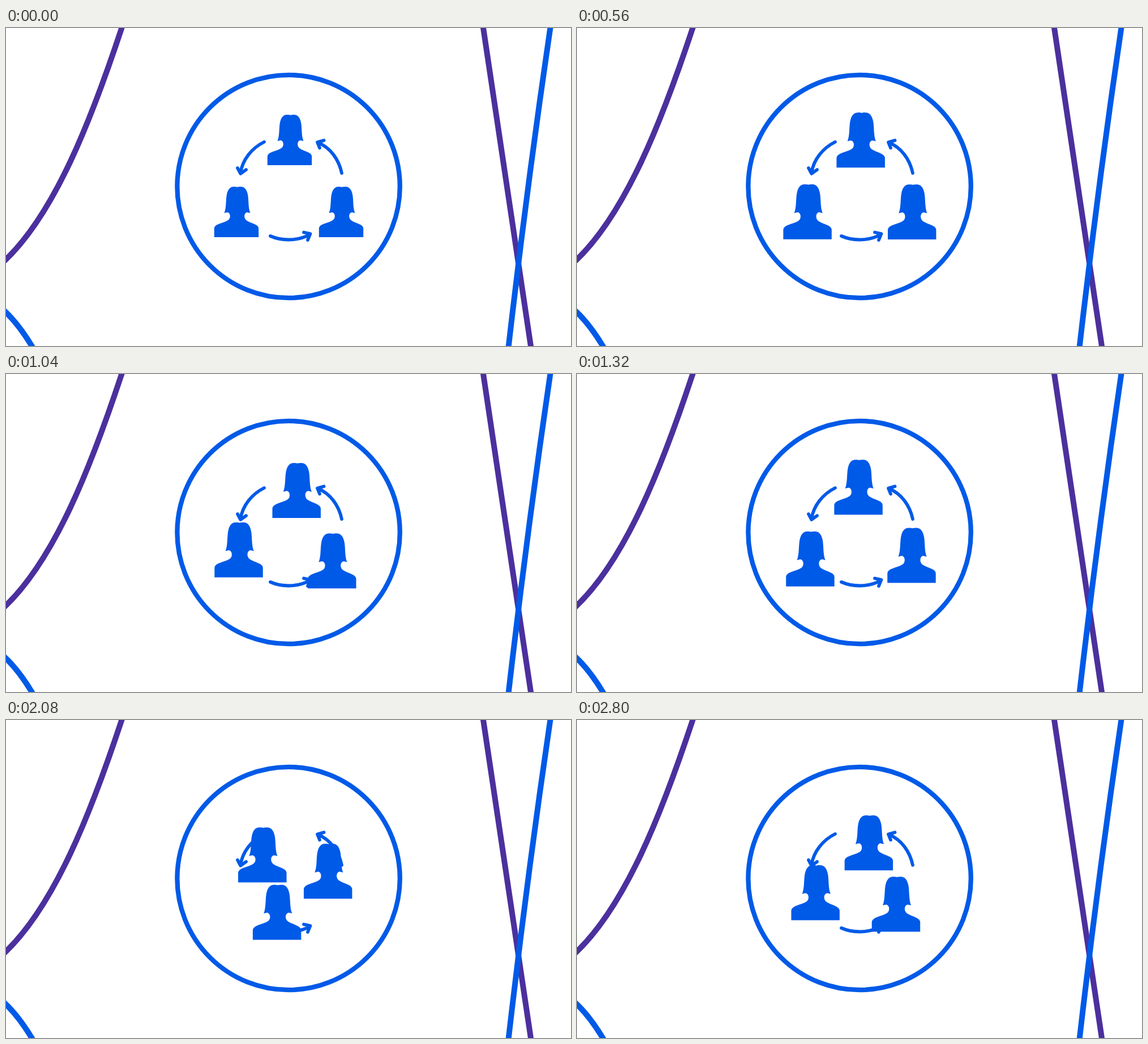
Recreate the animation shown at these times as an HTML page. Size 998 by 561 pixels, loop 2840 ms.

```html
<!DOCTYPE html>
<html lang="en">
<head>
<meta charset="utf-8">
<title>Rotating team</title>
<style>
  html, body { margin: 0; height: 100%; overflow: hidden; background: #fff; }
  svg { display: block; width: 100vw; height: 100vh; }
  .line { fill: none; stroke: #005ae8; stroke-width: 10; }
  .purple { stroke: #4b309e; }
  .ring { stroke-width: 8.3; }
  .arrow { stroke-width: 5.8; stroke-linecap: round; stroke-linejoin: round; }
  .people { fill: #005ae8; }
</style>
</head>
<body>
<svg viewBox="0 0 998 561">
  <defs>
    <path id="person" d="M-39.2 44.5V29Q-39 25-34 22.5C-25 18-13 17-11.5 10C-10 4-14 0-16.5.8Q-18.5 1-21.5 2
      C-17.5-7-19-22-17-31C-15-40-11-44.5-5-44.5Q0-44.7 1.5-43.8Q3-44.7 8-44.5C14-44.5 18-40 20-31
      C22-22 20.5-7 24.5 2Q21.5 1 19.5.8C17 0 13 4 14.5 10C16 17 26 18 34 22.5Q39 25 39.2 29V44.5Z"/>
  </defs>
  <path class="line purple" d="M207-8C150 165 85 330-5 413M842-7L928 568"/>
  <path class="line" d="M962.4-7Q920 280 887 568M-5 497Q22 521 48 565"/>
  <circle class="line ring" cx="499.1" cy="279.5" r="196.7"/>
  <path class="line arrow" d="M456 201C434 212 418 232 414 256M409 247L414.3 257L424 250
    M593 256C588 232 573 211 551 202M561.5 198.3L550 201.5L554 211.5
    M467 367C490 377 518 375 537 364M526 360.5L537.5 363L533 374"/>
  <g class="people"></g>
</svg>
<script>
const LOOP = 2840, TICK = 40, TURN = 597;
const seats = [[501, 197.5], [407, 324.5], [592, 324.5]];

const group = document.querySelector('.people');
const people = seats.map(() => {
  const person = document.createElementNS('http://www.w3.org/2000/svg', 'use');
  person.setAttribute('href', '#person');
  return group.appendChild(person);
});

// Slow at both seats, fast between them.
function ease(u) {
  const gone = u ** 2.5, left = 1.35 * (1 - u) ** 2.5;
  return gone / (gone + left);
}

function draw() {
  const time = Math.floor(performance.now() / TICK + 0.1) * TICK % LOOP;
  const turn = Math.floor(time / TURN), u = time / TURN - turn;
  const along = ease(u);
  // The arcs between seats swell and flatten once per loop.
  const bulge = 21 * Math.sin(Math.PI * time / LOOP) * Math.sin(Math.PI * along);
  // People are larger while on the move.
  const scale = 1 + 0.09 * Math.min(1, 25 * u, 25 * (1 - u));

  people.forEach((person, i) => {
    const [x, y] = seats[(i + turn) % 3], [nextX, nextY] = seats[(i + turn + 1) % 3];
    const dx = nextX - x, dy = nextY - y, out = bulge / Math.hypot(dx, dy);
    person.setAttribute('transform',
      `translate(${x + dx * along - dy * out} ${y + dy * along + dx * out}) scale(${scale})`);
  });
  requestAnimationFrame(draw);
}
draw();
</script>
</body>
</html>
```
